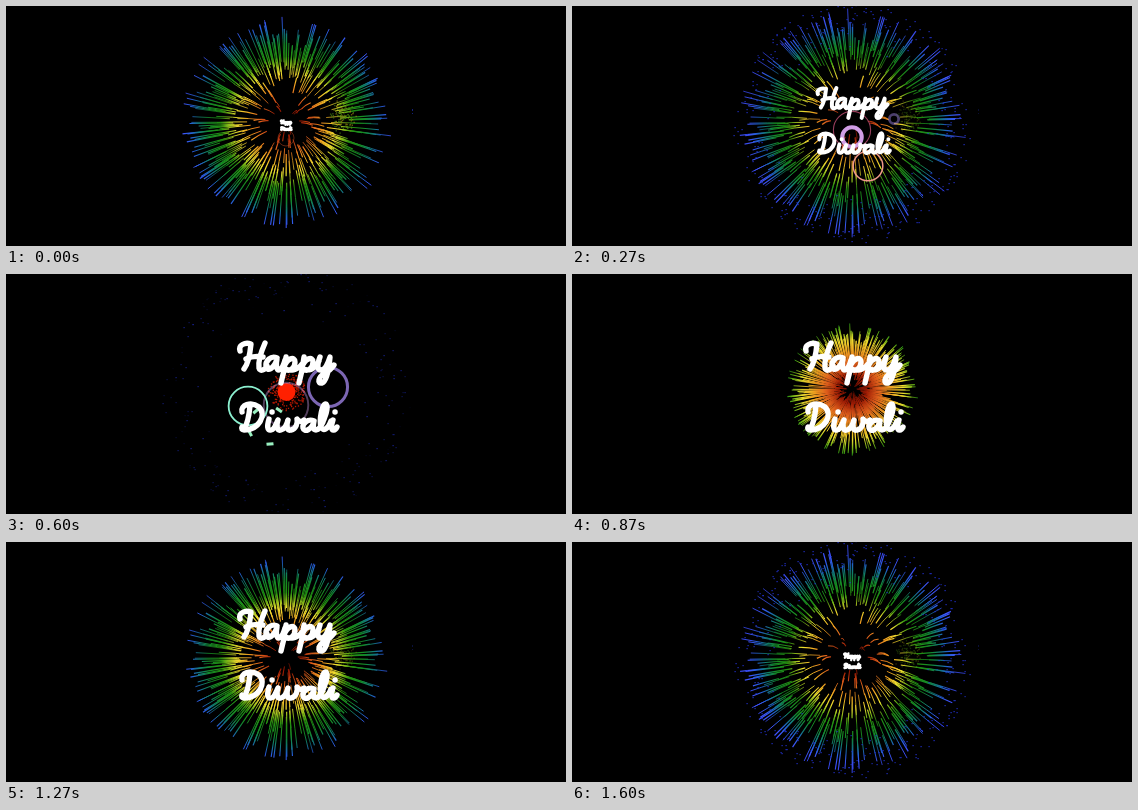
An HTML page with a canvas that plays this animation: 560 by 240 pixels, repeating every 1670 ms.

```html
<!DOCTYPE html>
<html lang="en">
<head>
<meta charset="utf-8">
<title>Happy Diwali</title>
<style>
  html, body { margin: 0; width: 100%; height: 100%; overflow: hidden; background: #000; }
  canvas { display: block; width: 560px; height: 240px; }
</style>
</head>
<body>
<canvas id="stage" width="560" height="240" role="img" aria-label="Happy Diwali"></canvas>
<script>
const ctx = document.getElementById('stage').getContext('2d');
const LOOP = 1670, FPS = 15, TAU = Math.PI * 2, CX = 280;
const clamp = (v, lo = 0, hi = 1) => Math.min(hi, Math.max(lo, v));
const ramp = (v, a, b) => clamp((v - a) / (b - a));

let seed = 71;
function rnd() {
  seed = (seed + 0x6D2B79F5) | 0;
  let x = Math.imul(seed ^ (seed >>> 15), 1 | seed);
  x = (x + Math.imul(x ^ (x >>> 7), 61 | x)) ^ x;
  return ((x ^ (x >>> 14)) >>> 0) / 4294967296;
}

// rho: share of the full radius, tail: where the trail starts, as a share of the head.
const sparks = Array.from({ length: 340 }, (_, i) => ({
  a: i * 2.39996 + (rnd() - .5) * .06,
  rho: rnd() ** .36,
  tail: .58 + rnd() * .2,
  w: .7 + rnd() * .6
}));
const embers = Array.from({ length: 330 }, () => ({
  a: rnd() * TAU, rho: .62 + .42 * Math.sqrt(rnd()), life: 1200 + rnd() * 320
}));
const haze = Array.from({ length: 110 }, () => ({
  x: 336 + (rnd() + rnd() - 1) * 14, y: 111 + (rnd() + rnd() - 1) * 18
}));
const grit = Array.from({ length: 240 }, () => ({ a: rnd() * TAU, r: 4 + 15 * rnd() }));

// Script lettering as pen strokes at full size.
const lettering = new Path2D(`
  M234 77C232 71 239 68 245 70C244 80 242 90 238 95
  M259 69C255 78 252 88 253 94C254 98 259 96 261 92
  M240 85C246 82 252 82 257 83
  M271 84C265 81 259 87 260 93C261 98 268 95 271 85C270 90 270 96 273 96C276 95 278 90 279 86
  M280 83C279 92 277 102 275 109
  M278 93C281 84 289 82 289 88C289 95 283 98 279 95C284 97 291 97 296 90
  M298 83C297 92 295 102 293 109
  M296 93C299 84 307 82 307 88C307 95 301 98 297 95C302 97 309 96 313 87
  M314 83C311 91 311 96 315 96C319 96 322 89 324 83C323 95 321 107 316 109C311 110 312 103 319 99C323 97 326 94 328 91
  M244 132C243 142 241 151 238 155
  M236 138C234 131 245 127 253 133C261 141 253 156 238 156C236 156 235 155 236 153
  M263 145C261 152 261 157 265 156C268 156 270 150 272 146
  M266 138h.1
  M272 146C270 152 271 157 275 156C279 155 281 150 282 146C280 152 281 157 285 156C290 155 292 149 291 145C293 148 296 148 298 146
  M308 147C302 144 296 150 297 154C298 159 306 156 308 147C307 152 307 156 310 156C313 156 315 152 317 148
  M315 151C319 145 323 133 320 130C316 129 313 146 315 153C317 158 322 155 325 147
  M327 146C325 152 325 157 328 156C329 156 330 155 331 153
  M329 138h.1`);

const rings = [
  { x: 280, y: 131, born: 130, life: 570, r: 23, w: 5, c: '#d9a3ee' },
  { x: 280, y: 124, born: 60, life: 340, r: 22, w: 2, c: '#b0486a' },
  { x: 296, y: 160, born: 70, life: 370, r: 19, w: 2.5, c: '#f0988c' },
  { x: 322, y: 113, born: 200, life: 600, r: 22, w: 6, c: '#a98cf4' },
  { x: 242, y: 132, born: 400, life: 380, r: 25, w: 3, c: '#8cf0d0' }
];

const reach = age => Math.max(0, 15 + 110 * (1 - Math.exp(-age / 423)));

const hues = ctx.createRadialGradient(0, 0, 0, 0, 0, 120);
[[0, '#400400'], [.12, '#a01c04'], [.22, '#e0601c'], [.32, '#f0a020'], [.42, '#f0e030'],
 [.49, '#80b818'], [.55, '#249010'], [.65, '#148c28'], [.73, '#127c78'], [.8, '#2460d8'],
 [.87, '#4056ff'], [1, '#2c38e0']]
  .forEach(([o, c]) => hues.addColorStop(o, c));

function drawSparks(age, R) {
  ctx.globalAlpha = 1 - ramp(age, 1000, 1290);
  ctx.strokeStyle = hues;
  for (const s of sparks) {
    const cos = Math.cos(s.a), sin = Math.sin(s.a);
    const head = s.rho * R;
    const tail = head * s.tail * (.4 + .6 * ramp(age, 200, 850));
    const mid = (head + tail) / 2;
    const droop = 6 * (1 - s.rho) * (age / 1000) ** 2;
    ctx.lineWidth = s.w;
    ctx.beginPath();
    ctx.moveTo(cos * tail, sin * tail);
    ctx.quadraticCurveTo(cos * mid, sin * mid, cos * head, sin * head + droop);
    ctx.stroke();
  }
}

function drawEmbers(age, R) {
  ctx.fillStyle = '#2434d8';
  for (const e of embers) {
    const r = e.rho * R;
    ctx.globalAlpha = ramp(age, 850, 1000) * ramp(e.life + 60 - age, 0, 320) * .9;
    ctx.fillRect(Math.round(Math.cos(e.a) * r), Math.round(Math.sin(e.a) * r), 1.2, 1.2);
  }
}

function drawCore(age) {
  const k = clamp((age + 90) / 90, .2, 2);
  ctx.globalAlpha = 1 - ramp(age, 40, 180);
  ctx.fillStyle = '#b81800';
  for (const g of grit) ctx.fillRect(Math.cos(g.a) * g.r * k, 2 + Math.sin(g.a) * g.r * k, 1.3, 1.3);
  ctx.fillStyle = '#ff2000';
  ctx.beginPath();
  ctx.arc(0, 3, 9 * Math.min(k, 1.2), 0, TAU);
  ctx.fill();
}

function drawHaze(age) {
  ctx.globalAlpha = .7 * ramp(age, 600, 740) * (1 - ramp(age, 820, 1150));
  haze.forEach((h, i) => {
    ctx.fillStyle = i % 3 ? '#4a8a10' : '#a09010';
    ctx.fillRect(h.x, h.y, 1.3, 1.3);
  });
  ctx.fillStyle = '#2030b0';
  ctx.fillRect(406, 103, 1, 2);
  ctx.fillRect(406, 107, 1, 1);
}

function burst(age) {
  if (age < -70) return;
  const R = reach(age);
  ctx.save();
  ctx.translate(CX + .5, 115 + clamp(age, 0, 1000) * .002);
  if (age > 40 && age < 1290) drawSparks(age, R);
  if (age > 850) drawEmbers(age, R);
  if (age < 180) drawCore(age);
  ctx.restore();
  drawHaze(age);
  ctx.globalAlpha = 1;
}

function circle(x, y, r, width, color, alpha) {
  ctx.globalAlpha = alpha;
  ctx.strokeStyle = color;
  ctx.lineWidth = width;
  ctx.beginPath();
  ctx.arc(x, y, r, 0, TAU);
  ctx.stroke();
  ctx.globalAlpha = 1;
}

function drawRings(t) {
  for (const o of rings) {
    const p = (t - o.born) / o.life;
    if (p <= 0 || p >= 1) continue;
    const r = o.r * (1 - (1 - p) ** 2);
    const width = Math.max(1, Math.min(o.w * (1 - p * .75), r * .6));
    circle(o.x, o.y, r, width, o.c, Math.min(1, p * 4, (1 - p) * 2.2));
  }
  // Last trace of an earlier ring
  if (t < 130) circle(280, 132, 8, 1, '#c04820', .5 * (1 - t / 130));
}

function confetti(t) {
  const p = (t - 450) / 300;
  if (p <= 0 || p >= 1) return;
  ctx.globalAlpha = Math.min(1, (1 - p) * 2);
  ctx.strokeStyle = '#98f0c0';
  ctx.lineWidth = 3;
  ctx.lineCap = 'butt';
  [[6, 19, -.1], [-8, -14, -.7], [15, -15, .6], [-14, 8, 1.1]].forEach(([x, y, a]) => {
    const k = .5 + p, dx = Math.cos(a) * 3.5, dy = Math.sin(a) * 3.5;
    ctx.beginPath();
    ctx.moveTo(258 + x * k - dx, 151 + y * k - dy);
    ctx.lineTo(258 + x * k + dx, 151 + y * k + dy);
    ctx.stroke();
  });
  ctx.globalAlpha = 1;
}

function greeting(t) {
  const s = clamp(Math.min(.11 + t * .00237, .67 + (1400 - t) * .0025), .1, 1);
  ctx.save();
  ctx.translate(CX, 120);
  ctx.scale(s, s);
  ctx.translate(-CX, -120);
  ctx.strokeStyle = '#fff';
  ctx.lineCap = ctx.lineJoin = 'round';
  ctx.lineWidth = Math.max(5.4, 2.3 / s);
  ctx.stroke(lettering);
  ctx.restore();
}

function frame(now) {
  const t = Math.floor((now % LOOP + 4) * FPS / 1000) * 1000 / FPS;
  ctx.lineCap = 'butt';
  ctx.fillStyle = '#000';
  ctx.fillRect(0, 0, 560, 240);
  if (t < 860) burst(t + 745);
  burst(t - 600);
  drawRings(t);
  confetti(t);
  greeting(t);
  requestAnimationFrame(frame);
}
requestAnimationFrame(frame);
</script>
</body>
</html>
```
